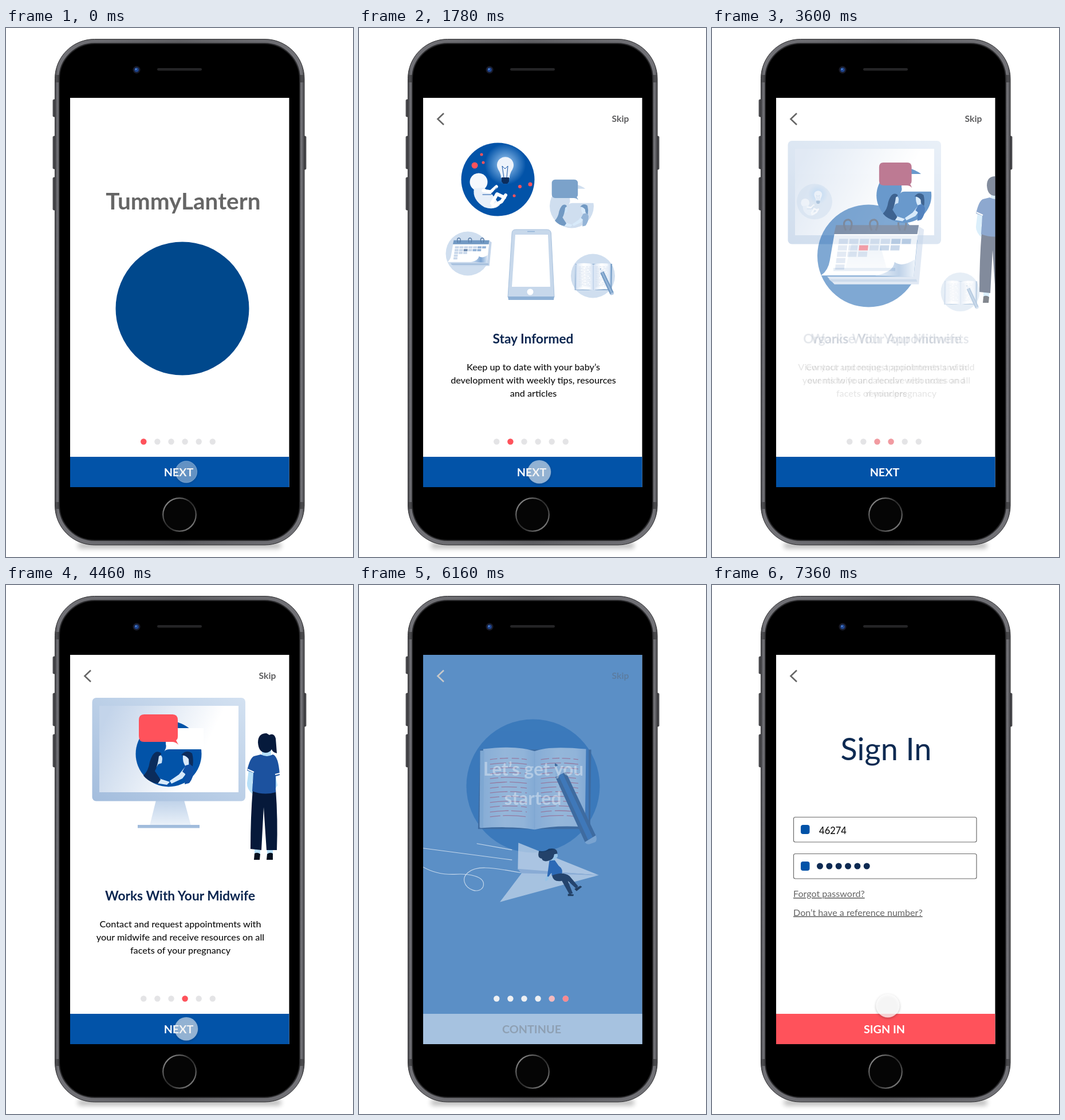
Animation, 606 px wide and 924 px high, one loop 7.86 s. Source, as an HTML page:

```html
<!DOCTYPE html>
<html lang="en">
<head>
<meta charset="utf-8">
<title>App onboarding</title>
<style>
  html, body { margin: 0; width: 100%; height: 100%; overflow: hidden; background: #fff; }
  svg { display: block; width: 606px; height: 924px; }
  text { font-family: Lato, "Open Sans", sans-serif; text-anchor: middle; }
  .b { font-weight: 700; }
  .title { font-size: 22.7px; font-weight: 700; fill: #0c2650; }
  .body { font-size: 16.2px; font-weight: 500; fill: #111; }
  .label { font-size: 19.8px; font-weight: 700; }
  .link { font-size: 16.1px; fill: #666; text-anchor: start; text-decoration: underline; }
  .bg { fill: var(--bg); }
  .dk { fill: var(--dk); }
  .md { fill: var(--md); }
  .ac { fill: var(--ac); }
  .line { fill: none; stroke: #fff; stroke-linecap: round; stroke-linejoin: round; }
</style>
</head>
<body>
<svg viewBox="0 0 606 924">
  <defs>
    <clipPath id="screen"><rect x="112" y="122" width="382.5" height="680"/></clipPath>
    <filter id="soft" x="-20%" y="-200%" width="140%" height="500%"><feGaussianBlur stdDeviation="4"/></filter>
    <filter id="drop" x="-50%" y="-50%" width="200%" height="200%">
      <feDropShadow dx="0" dy="1.5" stdDeviation="2" flood-color="#000" flood-opacity=".4"/>
    </filter>
    <radialGradient id="glow">
      <stop offset=".3" stop-color="#9cc8f2" stop-opacity=".75"/><stop offset="1" stop-color="#9cc8f2" stop-opacity="0"/>
    </radialGradient>
    <linearGradient id="page"><stop offset="0" stop-color="#d5e2f3"/><stop offset=".45" stop-color="#fff"/><stop offset=".8" stop-color="#f4f8fd"/><stop offset="1" stop-color="#ccdcf0"/></linearGradient>
    <linearGradient id="curl"><stop offset="0" stop-color="#dce8f6"/><stop offset=".6" stop-color="#7fa6d3"/><stop offset="1" stop-color="#dce8f6"/></linearGradient>
    <linearGradient id="bezel" x1="0" y1="1" x2="1" y2="0"><stop offset="0" stop-color="#a3bddd"/><stop offset="1" stop-color="#d3e1f1"/></linearGradient>
    <linearGradient id="panel" x1="0" y1=".3" x2="1" y2=".6"><stop offset="0" stop-color="#c3d4ea"/><stop offset=".75" stop-color="#fff"/></linearGradient>
    <linearGradient id="stand" x1="0" y1="0" x2="0" y2="1"><stop offset="0" stop-color="#bfd2e9"/><stop offset="1" stop-color="#eaf1f9"/></linearGradient>
    <linearGradient id="ring" x1="0" y1="0" x2="1" y2="1"><stop offset="0" stop-color="#aaa"/><stop offset=".45" stop-color="#2b2b2b"/><stop offset=".6" stop-color="#333"/><stop offset="1" stop-color="#999"/></linearGradient>
    <linearGradient id="rim"><stop offset="0" stop-color="#4b4b4f"/><stop offset=".012" stop-color="#727277"/><stop offset=".5" stop-color="#5e5e62"/><stop offset=".988" stop-color="#727277"/><stop offset="1" stop-color="#4b4b4f"/></linearGradient>
  </defs>

  <!-- handset -->
  <rect x="125" y="899" width="356" height="10" rx="5" fill="#000" opacity=".28" filter="url(#soft)"/>
  <g fill="#4c4c50" stroke="#2c2c2e" stroke-width=".7">
    <rect x="82" y="125" width="5" height="30" rx="1.5"/><rect x="82" y="189" width="5" height="57" rx="1.5"/>
    <rect x="82" y="261" width="5" height="57" rx="1.5"/><rect x="519" y="189" width="5" height="58" rx="1.5"/>
  </g>
  <rect x="85.5" y="19.5" width="435.5" height="883.5" rx="69" fill="url(#rim)" stroke="#2b2b2d"/>
  <path d="M86 82v13h8v-13zM512 82v13h8v-13zM86 828v12h8v-12zM512 828v12h8v-12z" fill="#48484b"/>
  <rect x="93" y="27" width="420" height="868" rx="62" stroke="#2a2a2c" stroke-width="2"/>
  <circle cx="228" cy="73" r="6.5" fill="#1a1c2a"/><circle cx="228" cy="73" r="3.8" fill="#1f4691"/><circle cx="227" cy="72" r="1.3" fill="#5c93dd"/>
  <rect x="264" y="70" width="78" height="4.5" rx="2.2" fill="#242426"/>
  <circle cx="303" cy="850" r="28.8" fill="#050505" stroke="url(#ring)" stroke-width="2.2"/>

  <g clip-path="url(#screen)">
    <rect x="112" y="122" width="383" height="681" fill="#fff"/>
    <rect id="blue" x="112" y="122" width="383" height="681" fill="#0253a8"/>

    <g id="logo"><circle cx="308" cy="490" r="116.5" fill="#00488c"/></g>

    <g id="monitor">
      <path d="M262 376H311L323 420H251Z" fill="url(#stand)"/><rect x="230" y="419" width="108" height="5.5" fill="#a1bcdc"/>
      <rect x="150.500" y="197" width="267.500" height="180.500" rx="7" fill="url(#bezel)"/><rect x="163" y="211" width="243" height="151" fill="url(#panel)"/>
    </g>

    <g id="person">
      <path d="M447 286H463V304H447ZM424 322L421 346Q420 356 431 366L436 356L430 346L434 324ZM469 322L474 350L466 364L460 356L464 330ZM434 460H444V472H434ZM456 460H466V472H456Z" fill="#b8e0f8"/>
      <path d="M431 356H471Q475 410 473 463H455L450 388L446 463L427 461Q427 405 431 356Z" fill="#06193a"/>
      <path d="M445 296Q456 302 466 296Q476 299 478 332L471 334L471 362Q450 368 430 360L432 328L421 324Q426 302 433 299Z" fill="#1c529f"/>
      <path d="M422 322L433 327M470 331L478 329" stroke="#fff" stroke-width="2"/>
      <path d="M440 275Q440 259 455 259L460 262Q468 258 471 268Q472 280 473 294Q465 292 464 287Q460 293 453 293Q441 292 440 275Z" fill="#061a3c"/>
      <path d="M434 469Q439 466 444 470L443 480H433ZM456 470Q461 466 466 469L466 480H455Z" fill="#06101f"/>
    </g>

    <g id="phone">
      <path d="M274 352H328Q335 352 335.500 359L341 470H260L267 359Q267 352 274 352Z" fill="#c7d8eb" stroke="#a9c2de"/>
      <path d="M260 469H341L340 475H261Z" fill="#8fb1d6"/><path d="M273 361H330L334 452H267Z" fill="#fff"/>
      <circle cx="299" cy="461" r="5.500" fill="#fff"/><path d="M294 355.500H307" stroke="#8fb1d6" stroke-width="1.500"/>
    </g>

    <g id="baby">
      <circle class="bg" cx="242.500" cy="264.500" r="64"/><circle cx="255.500" cy="238" r="36" fill="url(#glow)"/>
      <path d="M248 262Q248 254 243 247A14.500 14.500 0 1 1 268 247Q263 254 263 262Z" fill="#edf3fb"/>
      <path class="line" d="M253 261L250 241L255 246L260 241L258 261" style="stroke:var(--md)"/>
      <path class="dk" d="M249 261H262V268L259 272H252L249 268Z"/>
      <circle cx="209" cy="269" r="15.500" fill="#f5f8fd"/>
      <path d="M201 280Q197 300 219 313Q236 319 246 309L232 290L218 279Z" fill="#e7eff9"/>
      <path class="line" d="M232 306L241 290L254 296M234 311L249 303L256 292" stroke-width="6"/>
      <path class="line" d="M217 284L230 286L240 277" stroke-width="5.500"/>
      <path class="line" d="M216 291L231 291L240 279" stroke-width="1" style="stroke:var(--md)"/>
      <g class="ac"><circle cx="214" cy="221" r="2.500"/><circle cx="202" cy="240" r="5.500"/><circle cx="217" cy="235" r="2.500"/><circle cx="271" cy="293" r="2.500"/><circle cx="281" cy="277" r="3"/><circle cx="299" cy="273" r="3.500"/></g>
    </g>

    <g id="calendar">
      <circle class="bg" cx="297" cy="396" r="99"/>
      <path d="M394 339L404 345L394 451H231L217 436H384Z" fill="#c4d5ea"/>
      <path d="M220 441H389L391 446H226Z" fill="#9db9da"/>
      <path d="M231 353H392L384 434H205Q219 424 222 405Z" fill="#fff"/>
      <path d="M310 434Q345 428 347 408Q362 419 386 403L384 437Z" fill="url(#curl)"/>
      <path class="dk" d="M234 336.500H394L391 354H230Z"/><g id="cells"></g>
      <path d="M253 347Q244 327 258 326Q269 329 261 347M303 347Q294 327 308 326Q319 329 311 347M358 347Q349 327 363 326Q374 329 366 347" fill="none" stroke-width="3.500" style="stroke:var(--ring)"/>
    </g>

    <g id="chat">
      <circle class="bg" cx="284" cy="295" r="57.500"/>
      <path d="M288 250H345V287H285Q279 287 276 291Q281 284 279 278V258Q279 250 288 250Z" fill="#fff"/>
      <path d="M286 342L302 331L314 316L322 320L308 338L289 347ZM268 338L286 344L281 349L262 346Z" fill="#d8eafa"/>
      <path d="M264 297Q273 295 273 304L272 311L266 313L261 321L257 308Z" fill="#cfe4f7"/>
      <path class="dk" d="M251 309Q258 286 270 293Q273 296 267 299Q265 316 260 325L270 340L265 347Q250 345 240 333Q249 324 251 309Z"/>
      <path d="M309 298Q319 292 320 303L319 314L313 316Q308 309 309 298Z" fill="#d8eafa"/>
      <path class="dk" d="M306 297Q315 286 325 294Q328 305 326 317Q319 314 319 304Q314 297 306 297Z"/>
      <path class="md" d="M314 315Q326 311 328 322Q328 336 320 346L312 348L313 330L308 326Z"/>
      <path class="ac" d="M241 226H291Q300 226 300 236V264Q300 270 297 271L301 279Q296 274 290 274H241Q232 274 232 264V236Q232 226 241 226Z"/>
    </g>

    <g id="book">
      <circle class="bg" cx="304" cy="351" r="128.500"/>
      <path class="dk" d="M202 281H416L414 434H198Z"/>
      <path class="md" d="M404 280H411V431H404Z"/>
      <path d="M208 280Q272 272 307 284V435Q265 428 202 432Z" fill="url(#page)"/><path d="M202 283H210L208 431H201Z" fill="#c0d3ea"/>
      <path d="M307 284Q335 273 406 280L404 430Q345 426 307 435Z" fill="url(#page)"/>
      <path d="M307 284V434" stroke="#bfd1e8" stroke-width="1.500"/>
      <g id="lines" fill="none" stroke-width="1.400" style="stroke:var(--ac)"></g>
      <path d="M346 307L347 334L367 324Z" fill="#e1eaf6"/><path class="dk" d="M346 307L346 315L352 311Z"/>
      <path class="dk" d="M347 334L367 324L425 447L404 459Z"/><path class="md" d="M353 331L361 327L419 450L410 455Z"/>
      <path d="M404 459L425 446Q428 455 424 459L413 463Q406 464 404 459Z" fill="#b2c9e4"/>
    </g>

    <g id="plane">
      <path class="line" stroke-width="1.200" d="M254 439.500L318 451M155 448L318 469.500M128 446C130 476 170 497 212 496C240 494 266 500 266 514C266 525 254 528 246 525C230 519 225 503 237 493C252 480 275 482 334 493"/>
      <path d="M330 438L478 497.500L329 487Z" fill="#d5e2f1"/><path d="M329 486L478 497.500L336 495Z" fill="#a2bcdd"/><path d="M336 494L478 497.500L296 547Z" fill="#d0deef"/>
      <path d="M395 455Q404 456 402 464L398 468L393 475L388 466ZM388 474L385 506L380 509L379 505L384 496Z" fill="#b8e0f8"/>
      <path d="M387 471L397 470L404 480Q414 487 409 497L391 498Q393 488 386 500L383 500Z" fill="#1456ad"/>
      <path d="M392 498Q412 490 424 499L440 518L436 522L421 508L430 531L424 533L410 508Q394 511 392 498Z" fill="#071c3e"/>
      <path d="M421 532L432 533L431 536H421ZM433 523L444 517L447 519L437 527Z" fill="#04142c"/>
      <path d="M402 458Q402 446 386 449Q379 455 368 453Q364 466 373 467Q375 474 386 471Q395 469 396 459Z" fill="#061a38"/>
    </g>

    <g id="texts"></g>

    <g id="brand"><text class="b" x="309.500" y="317" font-size="40.500" fill="#666">TummyLantern</text></g>
    <g id="start" class="b" font-size="31.500" fill="#fff"><text x="304.500" y="333">Let’s get you</text><text x="303.500" y="384">started</text></g>
    <g id="signin">
      <text x="304" y="306" font-size="54" fill="#0d2a52">Sign In</text>
      <g fill="#fff" stroke="#6a6a6a" stroke-width="1.200"><rect x="142.500" y="405.500" width="319.500" height="43.500" rx="3"/><rect x="142.500" y="469.500" width="319.500" height="43.500" rx="3"/></g>
      <g fill="#0253a8"><rect x="155" y="419" width="15.500" height="16" rx="4"/><rect x="155" y="483" width="15.500" height="16" rx="4"/></g>
      <text x="211" y="434.500" font-size="16.500" font-weight="500" fill="#111">46274</text>
      <path d="M188.500 491H271" stroke="#0d2a52" stroke-width="11" stroke-linecap="round" stroke-dasharray="0 16.350"/>
      <text class="link" x="142" y="545">Forgot password?</text><text class="link" x="142" y="577.500">Don’t have a reference number?</text>
    </g>

    <path id="back" d="M148 149L137.500 159L148 169" fill="none" stroke-width="2.600"/>
    <text id="skip" class="b" x="456.500" y="164" font-size="15.700" fill="#5c5c5e">Skip</text>
    <g id="dots"></g>
    <rect id="bar" x="112" y="749" width="383" height="54"/>
    <text id="next" class="label" x="301.500" y="782.500" fill="#fff">NEXT</text>
    <text id="continue" class="label" x="301.500" y="782.500" fill="#666">CONTINUE</text>
    <text id="enter" class="label" x="301" y="782.500" fill="#fff">SIGN IN</text>
    <g id="touch" filter="url(#drop)"><circle fill="#fff" stroke="#fff"/></g>
  </g>
</svg>
<script>
const $ = id => document.getElementById(id);
const clamp = v => Math.max(0, Math.min(1, v));
const lerp = (a, b, p) => a + (b - a) * p;
const smooth = p => p * p * (3 - 2 * p);
const rgb = hex => [1, 3, 5].map(i => parseInt(hex.slice(i, i + 2), 16));
const mix = (a, b, p) => {
  const to = rgb(b);
  return `rgb(${rgb(a).map((v, i) => Math.round(lerp(v, to[i], p)))})`;
};
const fade = (id, v) => { $(id).style.opacity = v; };

const BLUE = '#0253a8', RED = '#ff525b', WHITE = '#ffffff', GREY = '#666666';
const LOOP = 7860, STEP = 120;

// Runs of steps: start and count; the picture rests after each run.
const runs = [[200, 10], [1780, 8], [3120, 8], [4460, 7], [5680, 15]];
// Start and end of each change of screen.
const moves = [[320, 1280], [1900, 2620], [3240, 3960], [4580, 5180], [5800, 6400], [6520, 7360]];
// Tap time, time the finger is back, and whether the tap begins pressed.
const taps = [[200, 1280, 1], [1780, 2620, 0], [3120, 3960, 1], [4460, 5180, 0], [5680, 6280, 1], [6400, 7360, 0]];

const pages = [
  ['Stay Informed', 'Keep up to date with your baby’s', 'development with weekly tips, resources', 'and articles'],
  ['Organise Your Appointments', 'View your upcoming appointments and add', 'events to your calendar with notes and', 'reminders'],
  ['Works With Your Midwife', 'Contact and request appointments with', 'your midwife and receive resources on all', 'facets of your pregnancy'],
  ['Check In', 'Check in with your midwife and let her', 'know how you are progressing through a', 'daily activity']
];

// home: drawn centre and radius; poses per screen: x, y, radius, opacity, colour strength
const parts = {
  logo: { home: [308, 490, 116.5], poses: { 0: [308, 490, 116.5, 1], 1: [308, 450, 70, 0] } },
  monitor: { home: [284, 310, 133], poses: { 2: [248, 310, 133, 0], 3: [284, 310, 133, 1], 4: [284, 310, 175, 0] } },
  person: { home: [450, 370, 110], poses: { 2: [530, 370, 110, 0], 3: [450, 370, 110, 1], 4: [540, 370, 130, 0] } },
  phone: { home: [300, 414, 60], poses: { 0: [300, 430, 40, 0], 1: [300, 414, 60, 1], 2: [300, 410, 40, 0] } },
  baby: { home: [242.5, 264.5, 64], pale: '#cfdeef', poses: { 0: [300, 400, 10, 0, 1], 1: [242.5, 264.5, 64, 1, 1], 2: [193, 296.5, 42, 1, 0], 3: [165, 310, 20, 0, 0] } },
  calendar: { home: [297, 396, 99], pale: '#6f8cb0', poses: { 0: [300, 410, 8, 0, 0], 1: [190, 394, 38.5, 1, 0], 2: [297, 396, 99, 1, 1], 3: [250, 400, 80, 0, 1] } },
  chat: { home: [284, 295, 57.5], pale: '#7ba2ca', poses: { 0: [300, 400, 8, 0, 0], 1: [371.5, 311, 38.5, 1, 0], 2: [386.5, 290, 38.5, 1, 0], 3: [284, 295, 57.5, 1, 1], 4: [284, 280, 76, 0, 1] } },
  book: { home: [304, 351, 128.5], pale: '#a6bdd8', poses: { 0: [300, 410, 8, 0, 0], 1: [408.5, 433, 38.5, 1, 0], 2: [427, 452, 38, 1, 0], 3: [440, 470, 30, 0, 0], 4: [304, 351, 128.5, 1, 1], 5: [304, 351, 110, 0, 1] } },
  plane: { home: [303, 493, 175], poses: { 4: [160, 520, 150, 0], 5: [303, 493, 175, 1], 6: [470, 460, 175, 0] } }
};

function build() {
  let cells = '', lines = '', dots = '';
  [7, 6, 3, 1, 1].forEach((count, row) => {
    for (let c = 0; c < count; c++) {
      const x = 240 + 20.3 * c - 1.7 * row, y = 363 + 12.4 * row;
      const fill = row == 1 && c == 2 ? 'var(--ac)' : c > 4 - row * .2 ? '#94b3d7' : '#c8d7ea';
      cells += `<path d="M${x} ${y}h17.500l-1 10h-17.500z" style="fill:${fill}"/>`;
    }
  });
  for (let i = 0; i < 13; i++) {
    const y = 300 + 9.2 * i, a = 14 + i * 17 % 33, b = 16 + i * 23 % 31;
    lines += `<path d="M221 ${y}q36 -5 71 0" stroke-dasharray="${a} 5 ${b} 7"/>`
           + `<path d="M319 ${y}q34 -5 72 0" stroke-dasharray="${b} 6 ${a} 5"/>`;
  }
  for (let i = 0; i < 6; i++) {
    const at = `cx="${240.3 + 24.1 * i}" cy="722.5" r="5.2"`;
    dots += `<circle class="idle" ${at}/><circle class="on" ${at} fill="${RED}"/>`;
  }
  $('cells').innerHTML = cells;
  $('lines').innerHTML = lines;
  $('dots').innerHTML = dots;
  $('texts').innerHTML = pages.map(([title, ...rows]) =>
    `<g><text class="title" x="304" y="551">${title}</text>${
      rows.map((row, i) => `<text class="body" x="304.500" y="${598 + 23 * i}">${row}</text>`).join('')}</g>`).join('');
}

function snap(t) {
  const run = runs.filter(r => r[0] <= t).pop();
  return run ? run[0] + STEP * Math.min(run[1] - 1, Math.floor((t - run[0]) / STEP)) : 0;
}

function drawPart(id, pos) {
  const { home, pale, poses } = parts[id], el = $(id);
  const i = Math.floor(pos), from = poses[i], to = poses[i + 1] || (pos == i && from);
  el.style.display = from && to ? '' : 'none';
  if (!from || !to) return;
  const [x, y, r, opacity, tone] = from.map((v, k) => lerp(v, to[k], pos - i));
  el.setAttribute('transform', `translate(${x} ${y}) scale(${r / home[2]}) translate(${-home[0]} ${-home[1]})`);
  el.style.opacity = opacity;
  if (!pale) return;
  const tones = { bg: ['#cfdeef', BLUE], dk: ['#7199c3', '#0b2c5c'], md: ['#94b4d7', '#0f50a4'], ac: [pale, RED], ring: ['#587ba5', '#071d40'] };
  for (const name in tones) el.style.setProperty('--' + name, mix(...tones[name], tone));
}

function drawTouch(t) {
  const [hit, back, pressed] = taps.filter(a => a[0] <= t).pop() || [0, 1280, 1];
  const since = t - hit, resting = t >= back;
  const glass = !resting && (pressed || since > 0);
  const el = $('touch'), dot = el.firstChild;
  el.setAttribute('transform', resting ? 'translate(307 735)' : 'translate(314.8 775.3)');
  el.style.opacity = resting || t < 200 ? 1 : clamp(1 - (since - STEP) / 240);
  dot.setAttribute('r', glass ? 18.8 : 20.3);
  dot.setAttribute('fill-opacity', glass ? .34 : resting ? .7 : .52);
  dot.setAttribute('stroke-opacity', glass ? .3 : .1);
}

function draw(time) {
  const t = snap(time);
  const pos = moves.reduce((sum, [a, b]) => sum + smooth(clamp((t - a) / (b - a))), 0);
  const near = i => clamp(1 - Math.abs(pos - i));
  const shown = i => clamp(1 - 1.8 * Math.abs(pos - i));
  const blue = near(5);

  for (const id in parts) drawPart(id, pos);
  [...$('texts').children].forEach((g, i) => { g.style.opacity = shown(i + 1); });
  fade('blue', blue);
  fade('brand', shown(0));
  fade('start', shown(5));
  fade('signin', shown(6));
  fade('back', clamp(pos));
  $('back').style.stroke = mix(GREY, WHITE, blue);
  fade('skip', Math.min(clamp(pos), clamp(5 - pos)));
  fade('dots', clamp(6 - pos));
  document.querySelectorAll('.idle').forEach(d => { d.style.fill = mix('#e4e4e6', '#f4f6fa', blue); });
  document.querySelectorAll('.on').forEach((d, i) => { d.style.opacity = near(i); });
  $('bar').style.fill = pos <= 5 ? mix(BLUE, WHITE, blue) : mix(WHITE, RED, pos - 5);
  fade('next', clamp(1 - 1.8 * (pos - 4)));
  fade('continue', shown(5));
  fade('enter', shown(6));
  drawTouch(t);
}

build();
const began = performance.now();
(function tick() {
  draw((performance.now() - began) % LOOP);
  requestAnimationFrame(tick);
})();
</script>
</body>
</html>
```
